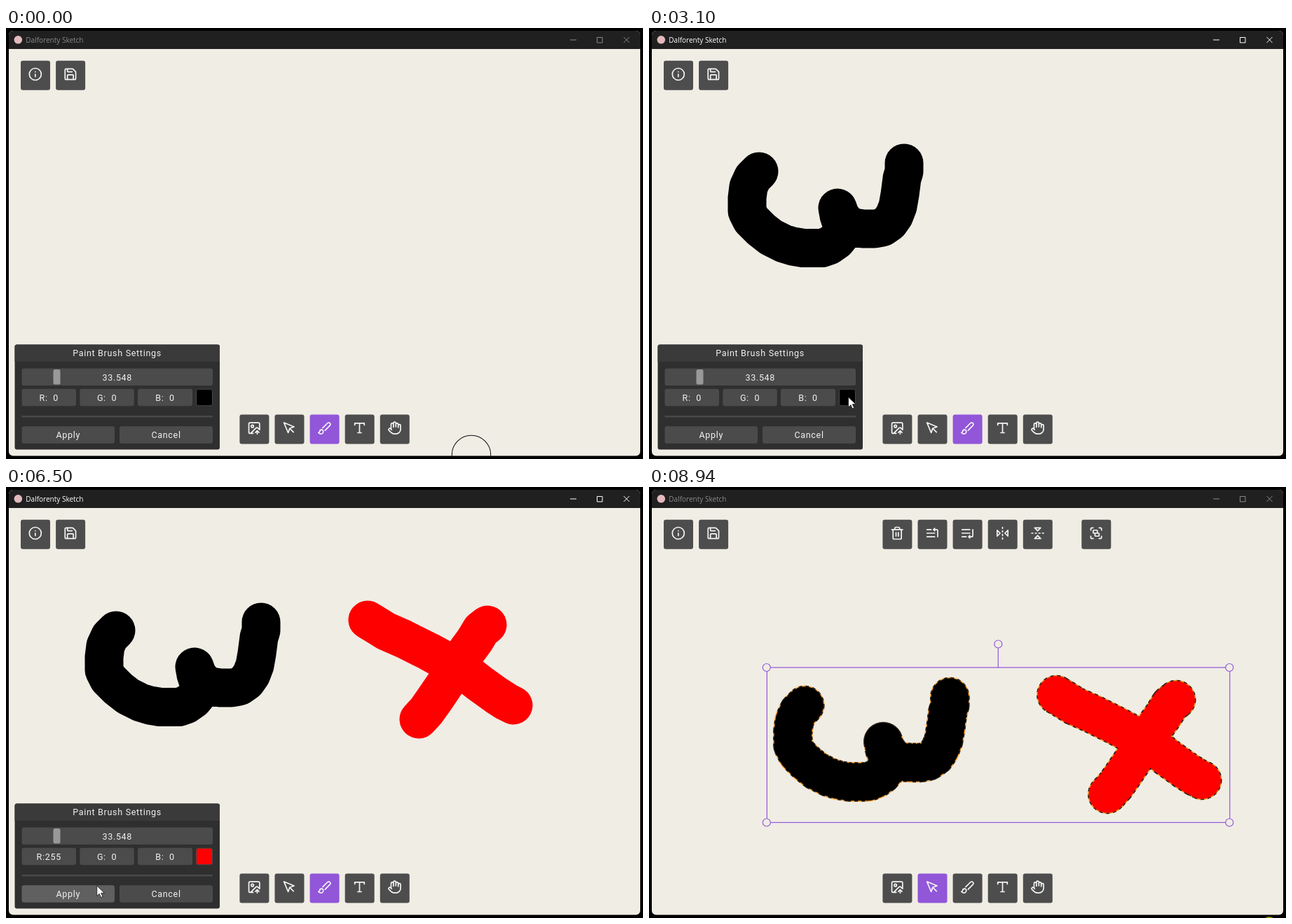
These frames come from a looping animation (909 by 616 pixels, 9010 ms). An HTML page:

```html
<!DOCTYPE html>
<html lang="en">
<head>
<meta charset="utf-8">
<title>Paint demo</title>
<style>
html, body { margin: 0; width: 100%; height: 100%; overflow: hidden; background: #000; }
svg { display: block; width: 909px; height: 616px; }
text { font: 12.5px Roboto, sans-serif; letter-spacing: .7px; fill: #f2f2f2; white-space: pre; }
.mid { text-anchor: middle; }
.name { font: 10px "Open Sans", sans-serif; letter-spacing: 0; fill: inherit; }
.box { fill: #4b4b4b; }
.icon { fill: none; stroke: #f4f4f4; stroke-width: 2; stroke-linecap: round; stroke-linejoin: round; }
.ink { fill: none; stroke-linecap: round; stroke-linejoin: round; }
.sel { fill: #f0ede5; stroke: #9256d9; stroke-width: 1.2; }
</style>
</head>
<body>
<script>
const PURPLE = '#9256d9', GREY = '#4d4d4d', PAPER = '#f0ede5';

const icons = {
  info: 'M2 12a10 10 0 1 0 20 0a10 10 0 1 0-20 0M12 16v-4M12 8h.01',
  save: 'M15.2 3a2 2 0 0 1 1.4.6l3.8 3.8a2 2 0 0 1 .6 1.4V19a2 2 0 0 1-2 2H5a2 2 0 0 1-2-2V5a2 2 0 0 1 2-2zM17 21v-7a1 1 0 0 0-1-1H8a1 1 0 0 0-1 1v7M7 3v4a1 1 0 0 0 1 1h7',
  image: 'M10.3 21H5a2 2 0 0 1-2-2V5a2 2 0 0 1 2-2h14a2 2 0 0 1 2 2v10l-3.1-3.1a2 2 0 0 0-2.8 0L6 21M14 19.5l3-3 3 3M17 22v-5.5M7 9a2 2 0 1 0 4 0a2 2 0 1 0-4 0',
  arrow: 'M3 3l7.07 16.97 2.51-7.39 7.39-2.51zM13 13l6 6',
  brush: 'M9.06 11.9l8.07-8.06a2.85 2.85 0 1 1 4.03 4.03l-8.06 8.08M7.07 14.94c-1.66 0-3 1.35-3 3.02 0 1.33-2.5 1.52-2 2.02 1.08 1.1 2.49 2.02 4 2.02 2.2 0 4-1.8 4-4.04a3.01 3.01 0 0 0-3-3.02z',
  type: 'M4 7V4h16v3M9 20h6M12 4v16',
  hand: 'M18 11V6a2 2 0 0 0-4 0M14 10V4a2 2 0 0 0-4 0v2M10 10.5V6a2 2 0 0 0-4 0v8M18 8a2 2 0 1 1 4 0v6a8 8 0 0 1-8 8h-2c-2.8 0-4.5-.86-5.99-2.34l-3.6-3.6a2 2 0 0 1 2.83-2.82L7 15',
  trash: 'M3 6h18M19 6v14c0 1-1 2-2 2H7c-1 0-2-1-2-2V6M8 6V4c0-1 1-2 2-2h4c1 0 2 1 2 2v2M10 11v6M14 11v6',
  front: 'M16 12H3M16 18H3M10 6H3M21 18V8a2 2 0 0 0-2-2h-5M16 8l-2-2 2-2',
  back: 'M16 12H3M16 6H3M10 18H3M21 6v10a2 2 0 0 1-2 2h-5M16 16l-2 2 2 2',
  flipH: 'M3 7l5 5-5 5zM21 7l-5 5 5 5zM12 20v2M12 14v2M12 8v2M12 2v2',
  flipV: 'M17 3l-5 5-5-5zM17 21l-5-5-5 5zM4 12H2M10 12H8M16 12h-2M22 12h-2',
  group: 'M3 7V5a2 2 0 0 1 2-2h2M17 3h2a2 2 0 0 1 2 2v2M21 17v2a2 2 0 0 1-2 2h-2M7 21H5a2 2 0 0 1-2-2v-2M8 7h5a1 1 0 0 1 1 1v3a1 1 0 0 1-1 1H8a1 1 0 0 1-1-1V8a1 1 0 0 1 1-1M11 12h5a1 1 0 0 1 1 1v3a1 1 0 0 1-1 1h-5a1 1 0 0 1-1-1v-3a1 1 0 0 1 1-1'
};

// brush strokes: colour and centre line
const strokes = [
  ['#000', '157,205 148,214 142,227 140,243 140,262 146,274 160,288 174,299 192,308 205,312 220,314.5 247,314.5 257,311 267,304 276,293 276,283 271,268 269,257 273,268 281,279 292,285 306,287 322,287 333,285 343,278 350,268 355,255 358,238 361,215 364,205 364,193'],
  ['#f00', '516,190 526,196 542,206 567,217 603,235 636,253 656,265 675,280 700,298 714,307 724,312'],
  ['#f00', '687,197 678,204 669,219 658,234 633,272 612,303 600,320 589,332']
];

const rect = (x, y, w, h, fill, extra = '') =>
  `<rect x="${x}" y="${y}" width="${w}" height="${h}" fill="${fill}" ${extra}/>`;
const tool = (name, x, y) => rect(x, y, 42, 42, GREY, `rx="3" id="b-${name}"`) +
  `<path class="icon" d="${icons[name]}" transform="translate(${x + 10.6} ${y + 9}) scale(.85)"/>`;
const row = (names, x, y) => names.map((n, i) => tool(n, x + i * 50.1, y)).join('');
const field = (x, y, w, label, id) =>
  `<rect id="${id}-box" class="box" x="${x}" y="${y}" width="${w}" height="24.5" rx="3"/>` +
  `<text id="${id}" class="mid" x="${x + w / 2}" y="${y + 17}">${label}</text>`;
const handle = (x, y) => `<circle class="sel" cx="${x}" cy="${y}" r="5.5"/>`;
const line = (pts, extra) => `<polyline class="ink" points="${pts}" ${extra}/>`;

const ends = strokes.flatMap(s => { const p = s[1].split(' '); return [p[0], p[p.length - 1]]; });
const outline = strokes.map(s => line(s[1], 'stroke="#f39a2b" stroke-width="56.4"')).join('') +
  strokes.map(s => line(s[1], 'stroke="#222" stroke-width="56.4" stroke-dasharray="5 5" style="stroke-linecap:butt"')).join('') +
  ends.map(p => {
    const [x, y] = p.split(',');
    return `<circle cx="${x}" cy="${y}" r="27.4" fill="none" stroke="#222" stroke-width="1.6" stroke-dasharray="5 5"/>`;
  }).join('');

const frame = `<g id="frame"><rect class="sel" x="103" y="151" width="660.5" height="221.5" style="fill:none"/>
  <path class="sel" d="M433 151v-28"/>${handle(433, 117.5)}
  ${handle(102.5, 151)}${handle(763, 151)}${handle(102.5, 372.5)}${handle(763, 372.5)}</g>`;

const panel = `<g id="panel">${rect(12.5, 452.5, 292.5, 150, '#2f2f2f', 'rx="3"')}
  <path d="M12.5 477v-21.5q0-3 3-3h286.500q3 0 3 3V477z" fill="#3a3a3a"/>
  <text class="mid" x="158.500" y="469">Paint Brush Settings</text>
  ${field(22.5, 486.500, 272.5, '33.548', 'size')}
  ${rect(67.5, 488, 10, 21.500, '#999', 'rx="2.5"')}
  ${field(22.5, 515.8, 77.500, '', 'r')}${field(105.3, 515.8, 77.500, '', 'g')}${field(188, 515.8, 78, '', 'b')}
  ${rect(271.5, 516.300, 23, 23.500, '#000', 'rx="3" stroke="#484848" id="swatch"')}
  ${rect(22.5, 554, 272.5, 2.500, '#484848')}
  ${field(22.5, 569.300, 132.5, 'Apply', 'apply')}${field(162, 569.300, 133, 'Cancel', 'cancel')}</g>`;

const hues = [0, 1, 2, 3, 4, 5, 6].map(i => `<stop offset="${i / 6}" stop-color="hsl(${i * 60} 100% 50%)"/>`).join('');
const picker = `<g id="picker">${rect(271.500, 240, 387.500, 368, '#252525', 'rx="2" stroke="#444"')}
  ${rect(281, 250, 261, 261, 'url(#sat)')}${rect(281, 250, 261, 261, 'url(#val)')}
  ${rect(547, 250, 24.500, 261, 'url(#hue)')}
  <path d="M547 246l4.500 4-4.500 4zM572 246l-4.500 4 4.500 4z" fill="#fff"/>
  <circle id="dot" r="8.3" stroke="#eee" stroke-width="1.4"/>
  <text x="576.500" y="261.500">Current</text>${rect(577, 269, 72, 48, '#000', 'rx="3" stroke="#555" id="current"')}
  <text x="576.500" y="334">Original</text>${rect(577, 342, 72, 47.500, '#000', 'rx="3" stroke="#555"')}
  ${['r2', 'g2', 'b2'].map((n, i) => field(281 + i * 98.500, 515.8, 93.500, '', n)).join('')}
  ${['h2', 's2', 'v2'].map((n, i) => field(281 + i * 98.500, 545, 93.500, '', n)).join('')}
  ${rect(281, 574.300, 290.500, 24.300, '#4b4b4b', 'rx="3"')}<text id="hex" x="286" y="591.300"></text></g>`;

document.body.innerHTML = `<svg viewBox="0 0 909 616"><defs>
  <clipPath id="win"><rect x="4" y="4" width="901" height="607.5" rx="6"/></clipPath>
  <linearGradient id="sat"><stop stop-color="#fff"/><stop offset="1" stop-color="#f00"/></linearGradient>
  <linearGradient id="val" x2="0" y2="1"><stop stop-color="#000" stop-opacity="0"/><stop offset="1"/></linearGradient>
  <linearGradient id="hue" x2="0" y2="1">${hues}</linearGradient></defs>
  ${rect(0, 0, 909, 616, '#000')}
  <g clip-path="url(#win)">${rect(4, 4, 901, 608, PAPER)}${rect(4, 4, 901, 26, '#202020')}
  <circle cx="17.300" cy="16.800" r="5.800" fill="#e3b9bd"/>
  <g id="bar"><text class="name" x="28.300" y="20.700">Dalforenty Sketch</text>
  <path d="M805 17h9M843.500 13.500h7.500v7.500h-7.500zM881.500 13l8 8M889.500 13l-8 8" fill="none" stroke="currentColor"/></g>
  <g id="art"><g id="outline">${outline}</g>
  ${strokes.map((s, i) => line(s[1], `id="s${i}" stroke="${s[0]}" stroke-width="55"`)).join('')}${frame}</g>
  ${row(['info', 'save'], 21, 46.800)}
  <g id="edit">${row(['trash', 'front', 'back', 'flipH', 'flipV'], 333.400, 46.800)}${tool('group', 617.300, 46.800)}</g>
  ${row(['image', 'arrow', 'brush', 'type', 'hand'], 333.400, 552.500)}
  ${panel}${picker}
  <circle id="ring" r="27.700" fill="none" stroke="#111" stroke-width="1.100"/></g>
  <path id="cursor" d="M0 0v14.500l3.400-3.200 2.300 5.200 2.500-1.100-2.300-5.100h4.700z" fill="#fff" stroke="#111" stroke-width=".8"/>
  <circle id="press" r="10" fill="#ff0" fill-opacity=".55"/></svg>`;

const $ = id => document.getElementById(id);
const show = (id, on) => { $(id).style.display = on ? '' : 'none'; };
const place = (id, p) => $(id).setAttribute('transform', `translate(${p[0]} ${p[1]})`);
const clamp = (v, a, b) => Math.min(b, Math.max(a, v));

// linear keyframes: [time, value, ...]
function key(t, keys) {
  if (t <= keys[0][0]) return keys[0].slice(1);
  for (let i = 1; i < keys.length; i++) {
    const a = keys[i - 1], b = keys[i];
    if (t < b[0]) return a.slice(1).map((v, j) => v + (b[j + 1] - v) * (t - a[0]) / (b[0] - a[0]));
  }
  return keys[keys.length - 1].slice(1);
}

const lines = strokes.map((s, i) => $('s' + i));
const sizes = lines.map(l => l.getTotalLength());
const at = (i, f) => { const p = lines[i].getPointAtLength(sizes[i] * f); return [p.x, p.y]; };

// painted part of each stroke, and the mouse running ahead of it
const paint = [
  [[1140, 0], [1310, .34], [2100, 1]],
  [[4660, 0], [4960, .75], [5110, 1]],
  [[5500, 0], [5870, .76], [5980, 1]]
];
const lead = [
  [[1000, 0], [1120, .338], [1950, 1]],
  [[4600, 0], [4960, 1]],
  [[5380, 0], [5420, 0], [5800, 1]]
];
const begin = [1060, 4660, 5500];
const mouse = [
  [300, 664, 610], [620, 520, 420], [850, 300, 260], [1060, 157, 205],
  [2100, 364, 193], [2210, 364, 193], [2480, 340, 380], [2700, 240, 578], [2850, 235, 581],
  [3060, 284.500, 527.500], [3170, 284.500, 527.500], [3500, 420, 400], [3900, 560, 222],
  [4460, 575, 230], [4640, 516, 190], [5110, 724, 312], [5350, 723, 300], [5380, 723, 294],
  [5440, 723, 294], [5500, 687, 197], [5980, 589, 332], [6150, 500, 390], [6500, 130, 570],
  [6700, 88, 576], [6870, 88, 574], [7150, 250, 300], [7420, 404, 575], [7820, 404, 578],
  [8020, 640, 270], [8080, 640, 270], [8620, 705, 377], [8700, 705, 377], [8900, 885, 624]
];
const clicks = [[3170, 3230], [3500, 3960], [6820, 6875], [7480, 7540], [8050, 8640], [8900, 9010]];

function draw(t) {
  const within = (a, b) => t >= a && t < b;
  const active = within(1050, 8930), panelOn = t < 6880, pickerOn = within(3240, 4460);
  const brush = t < 7520, picked = t >= 8060;

  $('bar').style.color = $('bar').style.fill = active ? '#fff' : '#8a8a8a';
  show('panel', panelOn);
  show('picker', pickerOn);
  show('edit', picked);
  show('frame', picked);
  show('outline', picked);
  $('b-brush').setAttribute('fill', brush ? PURPLE : GREY);
  $('b-arrow').setAttribute('fill', brush ? GREY : PURPLE);
  place('art', key(t, [[8100, 0, 0], [8620, 65.300, 107]]));

  let pos = key(t, mouse), tip = pos;
  lines.forEach((l, i) => {
    const f = key(t, paint[i])[0], k = lead[i], last = k[k.length - 1][0];
    l.style.display = t >= begin[i] ? '' : 'none';
    l.setAttribute('stroke-dasharray', f < 1 ? `${Math.max(.01, sizes[i] * f)} 9999` : 'none');
    l.setAttribute('stroke-width', picked ? 53.400 : 55);
    if (within(begin[i], paint[i][2][0])) pos = tip = at(i, f);
    if (within(k[0][0], last + 30)) tip = at(i, key(t, k)[0]);
  });
  const pressed = clicks.concat(lead.map(k => [k[0][0], k[k.length - 1][0] + 30])).some(c => within(c[0], c[1]));

  const [x, y] = pos;
  const overPanel = panelOn && x > 12 && x < 305 && y > 452;
  const overTools = x > 333 && x < 576 && y > 552;
  const hidden = within(3980, 4460) || within(7600, 7815);
  const arrow = overPanel || overTools || pickerOn || !brush;
  show('ring', !arrow && !hidden);
  show('cursor', arrow && !hidden && y < 605);
  show('press', pressed);
  place('ring', pos);
  place('cursor', pos);
  place('press', tip);
  const hover = (id, x0, x1) => {
    $(id + '-box').style.fill = overPanel && y > 569 && y < 594 && x > x0 && x < x1 ? '#606060' : '';
  };
  hover('apply', 22, 155);
  hover('cancel', 162, 295);

  // colour at the picker's dot
  const drag = t < 3500 ? [281, 511] : key(Math.min(t, 3960), mouse);
  const s = clamp((drag[0] - 281) / 261, 0, 1), v = clamp((511 - drag[1]) / 261, 0, 1);
  const red = Math.round(v * 255), rest = Math.round(v * (1 - s) * 255);
  const hex = '#' + [red, rest, rest].map(c => c.toString(16).padStart(2, '0')).join('').toUpperCase();
  const put = (id, name, n) => { $(id).textContent = name + ':' + String(n).padStart(3); };
  for (const n of ['', '2']) {
    put('r' + n, 'R', red);
    put('g' + n, 'G', rest);
    put('b' + n, 'B', rest);
  }
  put('h2', 'H', 0);
  put('s2', 'S', Math.round(s * 255));
  put('v2', 'V', red);
  $('hex').textContent = hex;
  for (const id of ['swatch', 'current', 'dot']) $(id).setAttribute('fill', hex);
  place('dot', [clamp(drag[0], 282, 540.500), clamp(drag[1], 251.300, 510)]);
}

const start = performance.now();
function tick() {
  draw((performance.now() - start) % 9010);
  requestAnimationFrame(tick);
}
tick();
</script>
</body>
</html>
```
